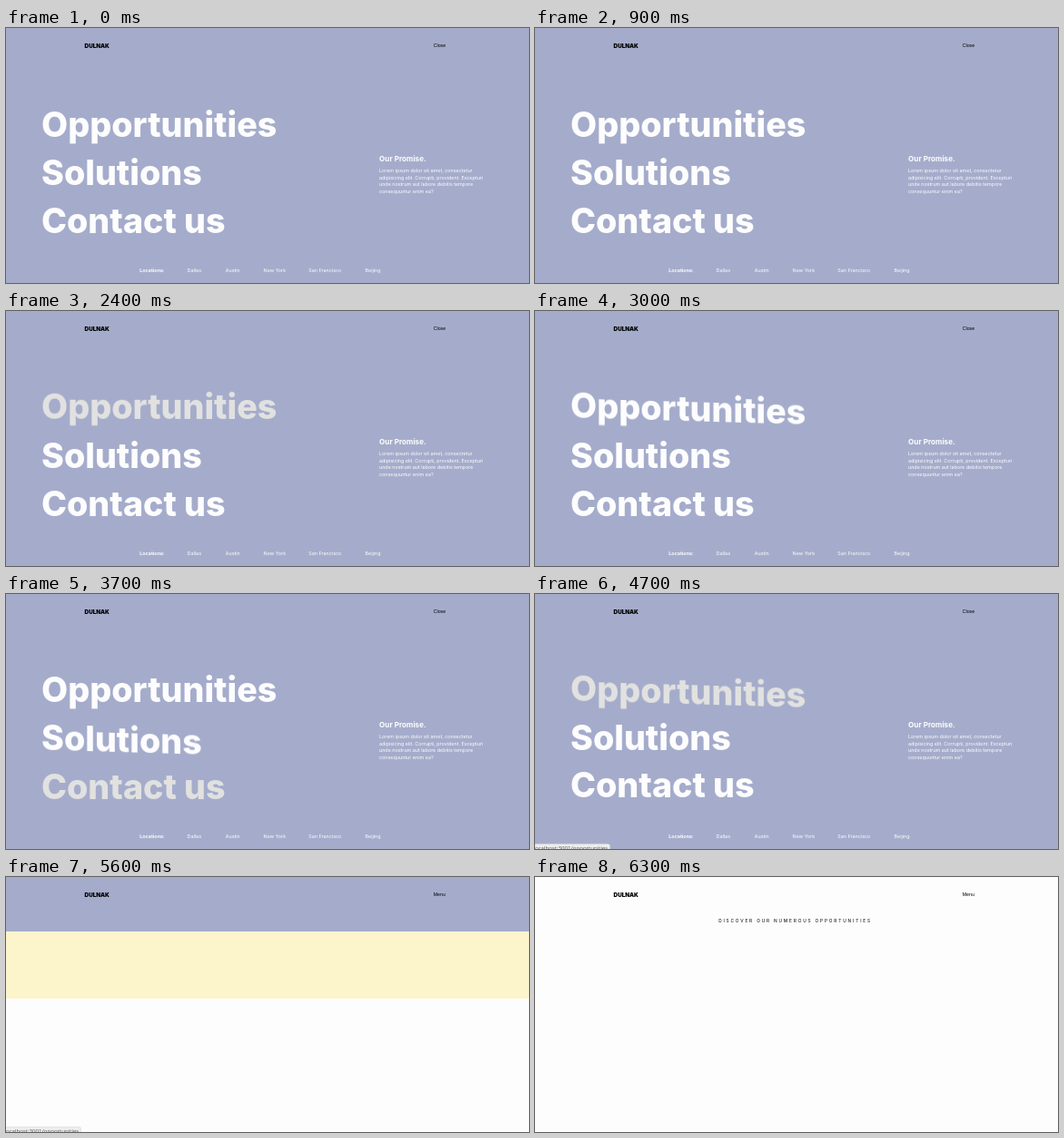
Recreate the animation shown at these times as an HTML page. Size 576 by 281 pixels, loop 8 s.

```html
<!DOCTYPE html>
<html lang="en">
<head>
<meta charset="utf-8">
<title>Menu transition</title>
<style>
  html, body { margin: 0; width: 100%; height: 100%; overflow: hidden; }
  body { position: relative; background: #fefdfe; }
  svg { position: absolute; left: 0; top: 0; width: 576px; height: 290px; }
  text {
    font-family: Inter, "Open Sans", sans-serif;
    font-optical-sizing: none;
    white-space: pre;
  }
  .bold { font-weight: 700; }

  /* Panels reach a little below the visible stage. */
  .panel {
    position: absolute; left: 0; top: 0; width: 100%; height: 290px;
    overflow: hidden;
    animation: 8s cubic-bezier(.76, 0, .24, 1) infinite;
  }
  .back { background: #fcf5cb; animation-name: close-back; }
  .menu { background: #a5accb; animation-name: close-menu; }
  .menu text { fill: #fdfdfe; }
  .small { font-size: 5.4px; }

  .link {
    font-size: 37.7px; font-weight: 800;
    transform-box: fill-box; transform-origin: center;
    --rest: translateY(0) skewY(0deg);
    --over: translateY(1.2px) skewY(1.7deg);
    --out: translateY(-1.2px) skewY(0deg);
    animation-duration: 8s;
    animation-iteration-count: infinite;
    animation-timing-function: cubic-bezier(.76, 0, .24, 1), step-end;
  }
  .first { animation-name: tilt-first, tint-first; }
  .second { animation-name: tilt-second, tint-second; }
  .third { animation-name: tilt-third, tint-third; }

  .logo { font-size: 6.3px; font-weight: 900; }
  .button { font: 5.2px "Liberation Sans", Arial, sans-serif; }
  .to-close { animation: hide-close 8s step-end infinite; }
  .to-menu { animation: show-menu 8s step-end infinite; }
  .title { font-size: 4.8px; font-weight: 500; letter-spacing: 1.82px; fill: #222; }

  .status { animation: status 8s step-end infinite; }
  .status rect { fill: #ededee; stroke: #d2d2d4; stroke-width: .5; }
  .status text { font: 6.1px "Open Sans", "Noto Sans", sans-serif; fill: #555; }

  @keyframes close-menu {
    0%, 64.04% { height: 290px; }
    74.04%, 100% { height: 0; }
  }
  @keyframes close-back {
    0%, 64.92% { height: 290px; }
    74.92%, 100% { height: 0; }
  }

  @keyframes tilt-first {
    0%, 16.25% { transform: var(--rest); }
    20%, 24.4% { transform: var(--over); }
    28.15%, 29.25% { transform: var(--out); }
    33%, 37% { transform: var(--over); }
    40.75%, 53.4% { transform: var(--out); }
    57.15%, 100% { transform: var(--over); }
  }
  @keyframes tint-first {
    0%, 24.4%, 37% { fill: #fdfdfe; }
    16.25%, 29.25%, 53.4%, 100% { fill: #e1e1e0; }
  }
  @keyframes tilt-second {
    0%, 39.4% { transform: var(--rest); }
    43.15%, 45.75% { transform: var(--over); }
    49.5%, 49.55% { transform: var(--out); }
    53.3%, 53.35% { transform: var(--over); }
    57.1%, 100% { transform: var(--out); }
  }
  @keyframes tint-second {
    0%, 45.75%, 53.35%, 100% { fill: #fdfdfe; }
    39.4%, 49.55% { fill: #e1e1e0; }
  }
  @keyframes tilt-third {
    0%, 45.75% { transform: var(--rest); }
    49.5%, 49.55% { transform: var(--over); }
    53.3%, 100% { transform: var(--out); }
  }
  @keyframes tint-third {
    0%, 49.55%, 100% { fill: #fdfdfe; }
    45.75% { fill: #e1e1e0; }
  }

  @keyframes hide-close {
    0% { visibility: visible; }
    64%, 100% { visibility: hidden; }
  }
  @keyframes show-menu {
    0% { visibility: hidden; }
    64%, 100% { visibility: visible; }
  }
  @keyframes status {
    0%, 24.5%, 74.3%, 100% { visibility: hidden; }
    18.75%, 54.6% { visibility: visible; }
  }
</style>
</head>
<body>
  <svg viewBox="0 0 576 290">
    <text class="title" x="202.2" y="49.7">DISCOVER OUR NUMEROUS OPPORTUNITIES</text>
  </svg>

  <div class="panel back"></div>

  <div class="panel menu">
    <svg viewBox="0 0 576 290">
      <text class="link first" x="39" y="120">Opportunities</text>
      <text class="link second" x="39" y="172.8">Solutions</text>
      <text class="link third" x="39" y="225.6">Contact us</text>

      <text class="bold" x="411.1" y="146.8" font-size="8.15">Our Promise.</text>
      <g class="small">
        <text x="411" y="158.6">Lorem ipsum dolor sit amet, consectetur</text>
        <text x="411" y="166.5">adipisicing elit. Corrupti, provident. Excepturi</text>
        <text x="411" y="174.4">unde nostrum aut labore debitis tempore</text>
        <text x="411" y="182.3">consequuntur enim ea?</text>

        <text class="bold" x="147.2" y="269.1">Locations:</text>
        <text x="199.6" y="269.1">Dallas</text>
        <text x="241.8" y="269.1">Austin</text>
        <text x="283.6" y="269.1">New York</text>
        <text x="333.3" y="269.1">San Francisco</text>
        <text x="395.5" y="269.1">Beijing</text>
      </g>
    </svg>
  </div>

  <svg viewBox="0 0 576 290">
    <text class="logo" x="86.6" y="21.6">DULNAK</text>
    <text class="button to-close" x="470.8" y="21.2">Close</text>
    <text class="button to-menu" x="470.8" y="21.2">Menu</text>
    <g class="status">
      <rect x="-5" y="275.5" width="87.5" height="20" rx="2"/>
      <text x="-1.6" y="281.8">localhost:3001/opportunities</text>
    </g>
  </svg>
</body>
</html>
```
